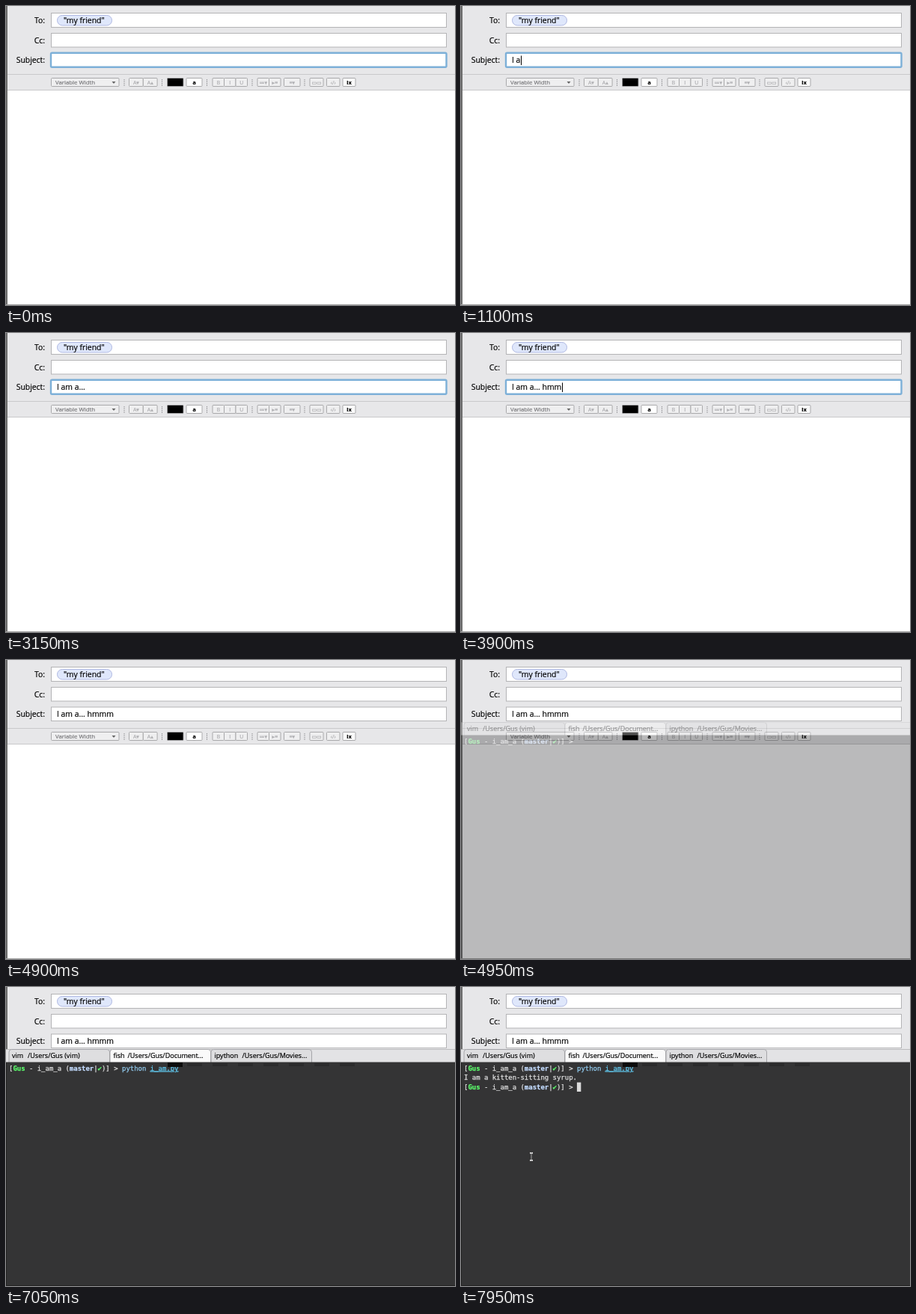
Recreate the animation shown at these times as an HTML page. Size 600x400 px, loop 8000 ms.

```html
<!DOCTYPE html>
<html lang="en">
<head>
<meta charset="utf-8">
<title>Mail and terminal</title>
<style>
  html, body { margin: 0; width: 100%; height: 100%; overflow: hidden; }
  svg { display: block; width: 100vw; height: 100vh; }
  text { white-space: pre; font: 10.4px "Open Sans", "Noto Sans", sans-serif;
         fill: currentColor; stroke: currentColor; stroke-width: .2; }
  tspan { fill: currentColor; stroke: currentColor; }
  .label { text-anchor: end; }
  .field { fill: #fff; stroke: #b4b4b6; }
  .btn { fill: #efeff0; stroke: #a2a2a4; stroke-width: .9; }
  .dim { font-size: 7.8px; color: #77777a; }
  .icon { font-size: 7px; color: #adadb0; text-anchor: middle; }
  .dark { color: #000; font-weight: bold; }
  .tab { fill: #dedee0; stroke: #98989c; stroke-width: .8; }
  .tabs text { font-size: 9px; }
  .mono text { font: 8.96px "DejaVu Sans Mono", "Liberation Mono", monospace;
               color: #e2e2e2; stroke-width: .25; }
  .green { color: #5cff6c; font-weight: bold; }
  .branch { color: #c3dcff; font-weight: bold; }
</style>
</head>
<body>
<svg viewBox="0 0 600 400" preserveAspectRatio="none">
  <rect width="600" height="400" fill="#fff"/>
  <rect width="600" height="112" fill="#e7e7e9"/>
  <path d="M0 91.5H600M0 112.5H600" stroke="#c9c9cb"/>
  <path d="M1 0V400" stroke="#6e6e6e" stroke-width="2"/>
  <path d="M0 399.5H600" stroke="#a6a6a6"/>

  <text class="label" x="52" y="22.8">To:</text>
  <text class="label" x="52" y="49.5">Cc:</text>
  <text class="label" x="52" y="76.4">Subject:</text>
  <rect class="field" x="60.5" y="9.5" width="528" height="19"/>
  <rect class="field" x="60.5" y="36.5" width="528" height="18.5"/>
  <rect class="field" x="60.5" y="63" width="528" height="18.5"/>
  <rect id="focus" x="60" y="62.7" width="528.5" height="19" rx="1.5" fill="none" stroke="#7db0d8" stroke-width="2.4"/>
  <rect x="68.5" y="12.5" width="73" height="13.5" rx="6.75" fill="#dfe7fb" stroke="#b0b9e2"/>
  <text x="77" y="22.8">"my friend"</text>
  <text id="subject" x="68" y="76.4"></text>
  <rect id="caret" y="66.5" width="1" height="12.5"/>

  <g id="toolbar">
    <rect class="btn" x="60.5" y="96.5" width="90.5" height="11" rx="1"/>
    <text class="dim" x="66" y="105">Variable Width</text>
    <path d="M141.5 101h5l-2.5 3z" fill="#666"/>
    <path d="M158 98v9M208.5 98v9M268.5 98v9M329 98v9M399 98v9" stroke="#909094" stroke-dasharray="1.5 1"/>
  </g>

  <g id="terminal">
    <rect y="83" width="600" height="18" fill="#e3e3e5"/>
    <path d="M0 83.5H600" stroke="#bcbcbe"/>
    <g class="tabs">
      <path id="tab" class="tab" d="M4 101V87q0-3.5 3.5-3.5H135q3.5 0 3.5 3.5V101"/>
      <use href="#tab" x="270"/>
      <path class="tab" d="M139 101V87q0-3.5 3.5-3.5H270q3.5 0 3.5 3.5V101" style="fill:#fafafa"/>
      <text x="8" y="94.8">vim</text><text x="29" y="94.8">/Users/Gus (vim)</text>
      <text x="143.5" y="94.8">fish</text><text x="162.5" y="94.8">/Users/Gus/Document...</text>
      <text x="278.5" y="94.8">ipython</text><text x="315.5" y="94.8">/Users/Gus/Movies...</text>
    </g>
    <rect y="100.5" width="600" height="299.5" fill="#343435"/>
    <rect x="216" y="101" width="20" height="6" fill="#0c0c0c"/>
    <path d="M242 104H466" stroke="#222" stroke-width="4" stroke-dasharray="20 14" opacity=".45"/>
    <path d="M.5 101V399.5H600" fill="none" stroke="#232323"/>
    <g class="mono">
      <text id="prompt" x="4" y="111.6">[<tspan class="green">Gus</tspan> - i_am_a (<tspan class="branch">master</tspan>|<tspan class="green">✔</tspan>)] &gt;</text>
      <text x="155" y="111.6"><tspan id="program" style="color:#93cdf2"></tspan><tspan id="script" style="color:#62cdf5" text-decoration="underline"></tspan></text>
      <text id="output" x="4" y="124.4">I am a kitten-sitting syrup.</text>
      <use id="next" href="#prompt" y="25.6"/>
      <rect id="block" width="5.4" height="12.4" fill="#dcdcdc"/>
    </g>
  </g>
  <g id="pointer" fill="none" stroke="#d8d8d8" stroke-width="2">
    <path id="beam" d="M92 222q2 0 2 1.5v7q0 1.5-2 1.5M96 222q-2 0-2 1.5v7q0 1.5 2 1.5"/>
    <path d="M94 223V231" stroke="#000" stroke-width="1"/>
  </g>
</svg>
<script>
const $ = id => document.getElementById(id);
const show = (id, on) => { $(id).style.display = on ? "" : "none"; };
const clamp = (v, lo, hi) => Math.min(hi, Math.max(lo, v));
const LOOP = 8000, CELL = 5.39;
const SUBJECT = "I am a... hmmm", COMMAND = "python i_am.py";
const BLUR = 4850, ENTER = 6800, OUTPUT = 7200;

// A run of adjoining buttons, one per label
function buttons(x, w, labels, ink = "", fill = "") {
  labels.split(" ").forEach((label, i) => {
    const left = x + i * w;
    $("toolbar").innerHTML +=
      `<rect class="btn" x="${left}" y="96.5" width="${w}" height="11" rx="1" style="fill:${fill}"/>` +
      `<text class="icon ${ink}" x="${left + w / 2}" y="104.5">${label}</text>`;
  });
}
buttons(164.5, 18.8, "A▾ A▴");
buttons(215.5, 21.5, "", "", "#000");
buttons(241, 21, "a", "dark", "#fff");
buttons(276, 15.5, "B I U");
buttons(336, 15.5, "≔▾ ▸≡");
buttons(371.5, 21.5, "≡▾");
buttons(406, 18, "▭▭");
buttons(428.5, 17.5, "‹/›");
buttons(450, 17, "Ix", "dark", "#fafafa");

// Subject is typed in bursts of evenly spaced keys
const KEY = 180;
const bursts = [{ start: 740, keys: 3 }, { start: 1350, keys: 6 }, { start: 3300, keys: 5 }];

function typing(t) {
  let count = 0, last = -750;
  for (const { start, keys } of bursts) {
    const n = clamp(Math.floor((t - start) / KEY) + 1, 0, keys);
    if (n) last = start + (n - 1) * KEY;
    count += n;
  }
  return { count, caret: t < BLUR && (t - last) % 1000 < 500 };
}

function drawMail(t) {
  const { count, caret } = typing(t);
  $("subject").textContent = SUBJECT.slice(0, count);
  const width = count ? $("subject").getComputedTextLength() : 0;
  $("caret").setAttribute("x", Math.round(68.9 + width));
  show("caret", caret);
  show("focus", t < BLUR);
}

function drawTerminal(t) {
  const fade = clamp(Math.floor((t - 4900) / 50) / 3, 0, 1);
  $("terminal").setAttribute("opacity", fade);

  const count = clamp(Math.floor((t - 5700) / 30) + 1, 0, COMMAND.length);
  $("program").textContent = COMMAND.slice(0, Math.min(count, 7));
  $("script").textContent = COMMAND.slice(7, Math.max(count, 7));
  show("output", t >= OUTPUT);
  show("next", t >= OUTPUT);

  const line = (t >= ENTER) + (t >= OUTPUT);
  const column = [28 + count, 0, 28][line];
  $("block").setAttribute("x", 4 + CELL * column);
  $("block").setAttribute("y", 102 + 12.8 * line);
  show("block", (t + 200) % 1100 < 550);
  show("pointer", t >= 7850);
}

const start = performance.now();
function tick() {
  const t = (performance.now() - start) % LOOP;
  drawMail(t);
  drawTerminal(t);
  requestAnimationFrame(tick);
}
tick();
</script>
</body>
</html>
```
